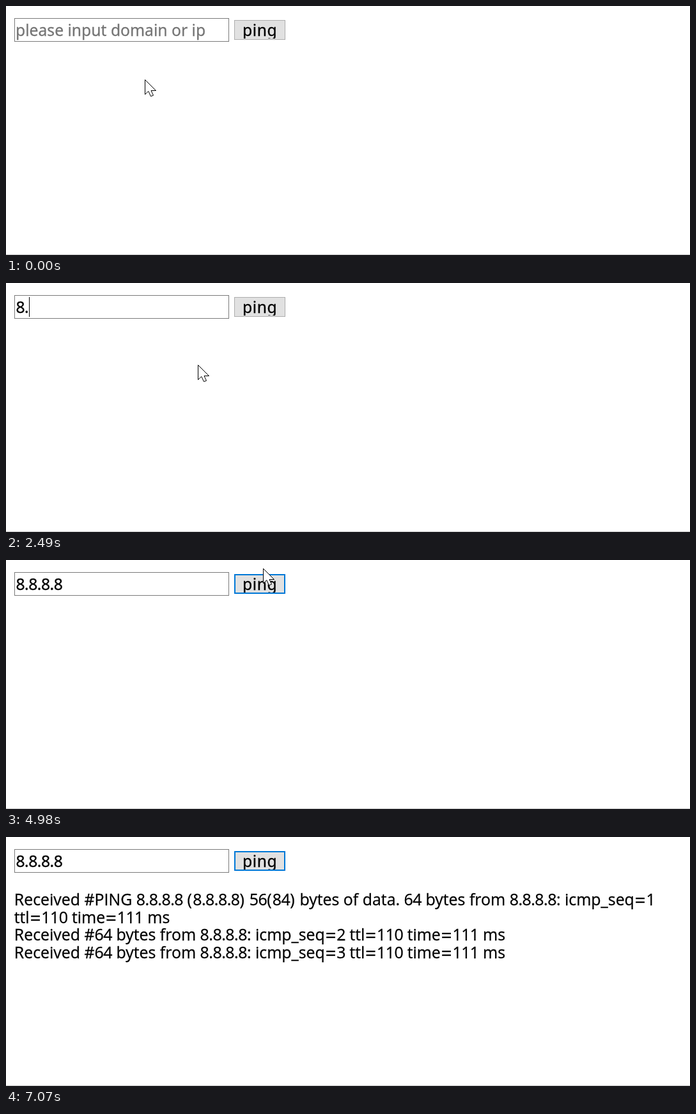
Recreate the animation shown at these times as an HTML page. Size 1070 px wide and 390 px high, loop 8 s.

```html
<!DOCTYPE html>
<html lang="en">
<head>
<meta charset="utf-8">
<title>Ping form</title>
<style>
  html, body { margin: 0; width: 100%; height: 100%; overflow: hidden; background: #fff; }
  svg { display: block; width: 1070px; height: 390px; }
  text { font: 24.7px "Noto Sans", "Open Sans", sans-serif; stroke: #000; stroke-width: .3px; }
  #log text { font: 24.9px "Open Sans", "Noto Sans", sans-serif; }
  .num { letter-spacing: -.5px; }
  .paren { letter-spacing: 1.3px; }
  .eq { font-size: 30px; letter-spacing: .7px; baseline-shift: -1.5px; }
  #hint { fill: #757575; stroke: #757575; }
  #label { letter-spacing: .6px; }
  #field { fill: #fff; stroke: #7a7a7a; }
  #field.hover { stroke: #171717; }
  #field.press { stroke: #0078d7; }
  #button { fill: #e1e1e1; stroke: #adadad; }
  #button.hover { fill: #e5f1fb; stroke: #0078d7; }
  #button.press { fill: #cce4f7; stroke: #005499; }
  #button.focus { stroke: #0078d7; }
  #ring { fill: none; stroke: #0078d7; }
  #arrow { fill: #fff; stroke: #000; }
  #beam { fill: none; stroke: #000; stroke-width: 2; }
</style>
</head>
<body>
<svg viewBox="0 0 1070 390">
  <clipPath id="inner"><rect x="359" y="24" width="76" height="27"/></clipPath>
  <rect y="389" width="1070" height="1" fill="#c6c6c6"/>
  <rect id="field" x="13.5" y="19.5" width="335" height="36"/>
  <text id="hint" x="15" y="47">please input domain or ip</text>
  <text id="value" class="num" x="15.5" y="47"></text>
  <rect id="caret" y="22" width="1" height="31"/>
  <rect id="button" x="357.5" y="22.5" width="79" height="30"/>
  <rect id="ring" x="358.5" y="23.5" width="77" height="28"/>
  <g clip-path="url(#inner)"><text id="label" x="370" y="47">ping</text></g>
  <g id="log"></g>
  <path id="arrow" d="M.5 .5V23.5L5.8 18.5L9.5 26.5L13.5 25L10 17.5H17.5Z"/>
  <path id="beam" d="M-6-11H-2L0-9L2-11H7M0-9V10M-6 12H-2L0 10L2 12H7"/>
</svg>
<script>
const LOOP = 8000, SAMPLE = 77;
const FOCUS = 800, BLINK = 530;
const TYPE_START = 2180, TYPE_END = 3660;
const PRESS = 4900, RELEASE = 4980, POINTER_GONE = 5130;
const FIRST_REPLY = 5190, REPLY_GAP = 940;
const $ = id => document.getElementById(id);

// Pointer strokes between key points
const home = { x: 217, y: 115 };
const strokes = [
  { from: 0, to: 300, x: 362, y: 44 },
  { from: 300, to: 690, x: 215, y: 44 },
  { from: 690, to: 860, x: 214, y: 48 },
  { from: 1010, to: 1390, x: 301, y: 120 },
  { from: 1550, to: 1630, x: 300, y: 128 },
  { from: 4210, to: 4670, x: 402, y: 32 },
  { from: 4820, to: 4980, x: 402, y: 13 }
];

const address = "8.8.8.8";
const keyGap = (TYPE_END - TYPE_START) / (address.length - 1);
const reply = n => `Received #64 bytes from ${address}: icmp_seq=${n} ttl=110 time=111 ms`;
const lines = [
  `Received #PING ${address} (${address}) 56(84) bytes of data. 64 bytes from ${address}: icmp_seq=1`,
  "ttl=110 time=111 ms", reply(2), reply(3)
];

const span = (cls, s, dx = 0) => `<tspan class="${cls}" dx="${dx}">${s}</tspan>`;
const format = s => s.replace(/=|[()]|\d[\d.]*/g, m =>
  m === "=" ? span("eq", m, .7) : span(/\d/.test(m) ? "num" : "paren", m));
$("log").innerHTML = lines
  .map((s, i) => `<text x="12.8" y="${Math.round(107 + 27.67 * i)}">${format(s)}</text>`).join("");
const rows = [...$("log").children];

const show = (el, on) => el.setAttribute("visibility", on ? "visible" : "hidden");
const during = (t, from, to) => t >= from && t < to;
const inside = (p, l, t, r, b) => during(p.x, l, r) && during(p.y, t, b);

// Eased strokes, held between screen samples
function pointer(t) {
  let { x, y } = home;
  for (const s of strokes) {
    if (t < s.from) break;
    const steps = Math.round((s.to - s.from) / SAMPLE);
    const p = Math.min(1, Math.floor(steps * (t - s.from) / (s.to - s.from)) / steps);
    const e = p * (2 - p);
    x += (s.x - x) * e;
    y += (s.y - y) * e;
  }
  return { x: Math.round(x), y: Math.round(y) };
}

// A free-running blink; each key turns the caret on again
function caretVisible(t, typed) {
  const last = typed ? TYPE_START + (typed - 1) * keyGap : FOCUS;
  const tick = time => Math.floor((time - FOCUS) / BLINK);
  return during(t, FOCUS, PRESS) && (tick(t) - tick(last)) % 2 === 0;
}

function draw(t) {
  const at = pointer(t);
  const present = t < POINTER_GONE;
  const onField = present && inside(at, 13, 19, 349, 56);
  const onButton = present && inside(at, 357, 22, 437, 53);
  const focused = t >= RELEASE;

  for (const id of ["arrow", "beam"]) $(id).setAttribute("transform", `translate(${at.x} ${at.y})`);
  show($("arrow"), present && !onField);
  show($("beam"), onField);

  $("field").setAttribute("class", during(t, 920, 1090) ? "press" : onField ? "hover" : "");
  $("button").setAttribute("class",
    during(t, PRESS, RELEASE) ? "press" : focused ? "focus" : onButton ? "hover" : "");
  show($("ring"), focused);

  const keys = Math.floor((t - TYPE_START) / keyGap + 1e-6) + 1;
  const typed = Math.max(0, Math.min(address.length, keys));
  $("value").textContent = address.slice(0, typed);
  show($("hint"), !typed);
  $("caret").setAttribute("x", Math.round(16.4 + $("value").getComputedTextLength()));
  show($("caret"), caretVisible(t, typed));

  rows.forEach((row, i) => show(row, t >= FIRST_REPLY + Math.max(0, i - 1) * REPLY_GAP));
}

const start = performance.now();
function tick() {
  draw((performance.now() - start) % LOOP);
  requestAnimationFrame(tick);
}
tick();
</script>
</body>
</html>
```
